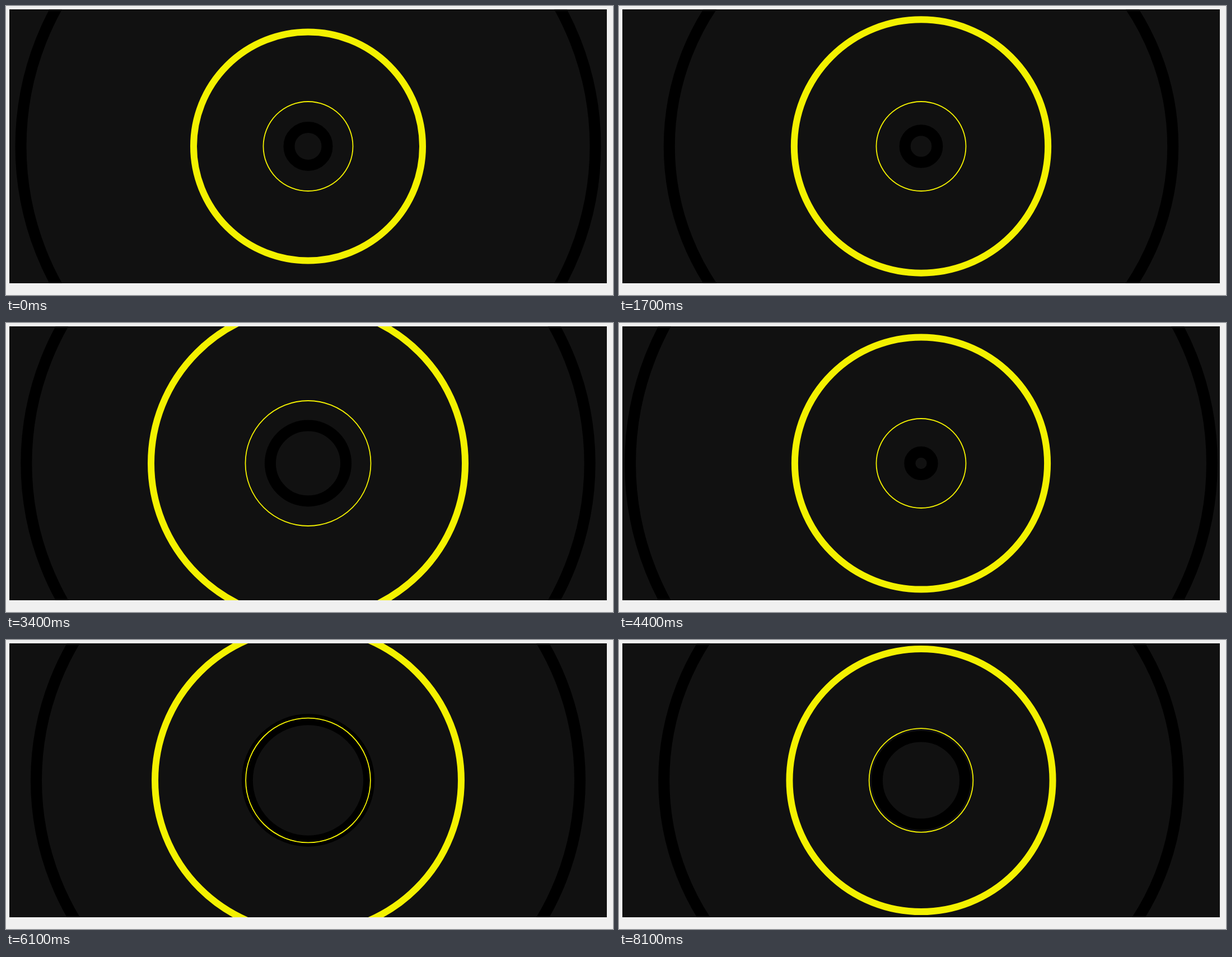
Write an HTML page with a canvas that moves like this. It is 1084 px wide and 517 px high and loops after 8.2 s.

```html
<!DOCTYPE html>
<html>
<head>
<meta charset="utf-8">
<title>Pulse rings</title>
<style>
html, body { margin: 0; width: 100%; height: 100%; overflow: hidden; background: #f0f0f0; }
canvas { position: absolute; left: 6px; top: 6px; }
</style>
</head>
<body>
<canvas id="stage" width="1067" height="490"></canvas>
<script>
const canvas = document.getElementById('stage');
const ctx = canvas.getContext('2d');
const LOOP = 8200, STEP = 100;
const BEAT = 449, HOLD = 257;
const YELLOW = '#f3f100', BLACK = '#000';

const smooth = u => u * u * (3 - 2 * u);
const attack = p => 1 - Math.exp(-p / 35);

// Sharp rise, hold, then a decay that settles above the starting size
function bigRadius(p) {
  return p < HOLD ? 204.5 + 76 * attack(p) : 217 + 63.5 * Math.exp((HOLD - p) / 51);
}

// The same rise with a short release, from 0 to 1
function kick(p) {
  return p < HOLD ? attack(p) : 1 - smooth(Math.min(1, (p - HOLD) / 72));
}

// A swing that slows down over the loop
function outerRadius(t) {
  return 480 + 0.0015 * t + 33 * Math.cos(8.6 * Math.log(1 + t / 4000));
}

// Each kick pushes the core further than the one before
function coreRadius(t, p) {
  return 27 + 7 * Math.cos(2 * Math.PI * t / LOOP) + kick(p) * t / 73;
}

function ring(r, width, color) {
  ctx.beginPath();
  ctx.arc(canvas.width / 2, canvas.height / 2, r, 0, Math.PI * 2);
  ctx.lineWidth = width;
  ctx.strokeStyle = color;
  ctx.stroke();
}

function draw(t) {
  const p = t % BEAT;
  ctx.fillStyle = '#111';
  ctx.fillRect(0, 0, canvas.width, canvas.height);
  ring(outerRadius(t), 20, BLACK);
  ring(coreRadius(t, p), 20, BLACK);
  ring(bigRadius(p), 12, YELLOW);
  ring(80 + 32 * kick(p), 1.8, YELLOW);
}

const start = performance.now();
function tick() {
  const t = (performance.now() - start) % LOOP;
  draw(Math.floor(t / STEP) * STEP);
  requestAnimationFrame(tick);
}
tick();
</script>
</body>
</html>
```
